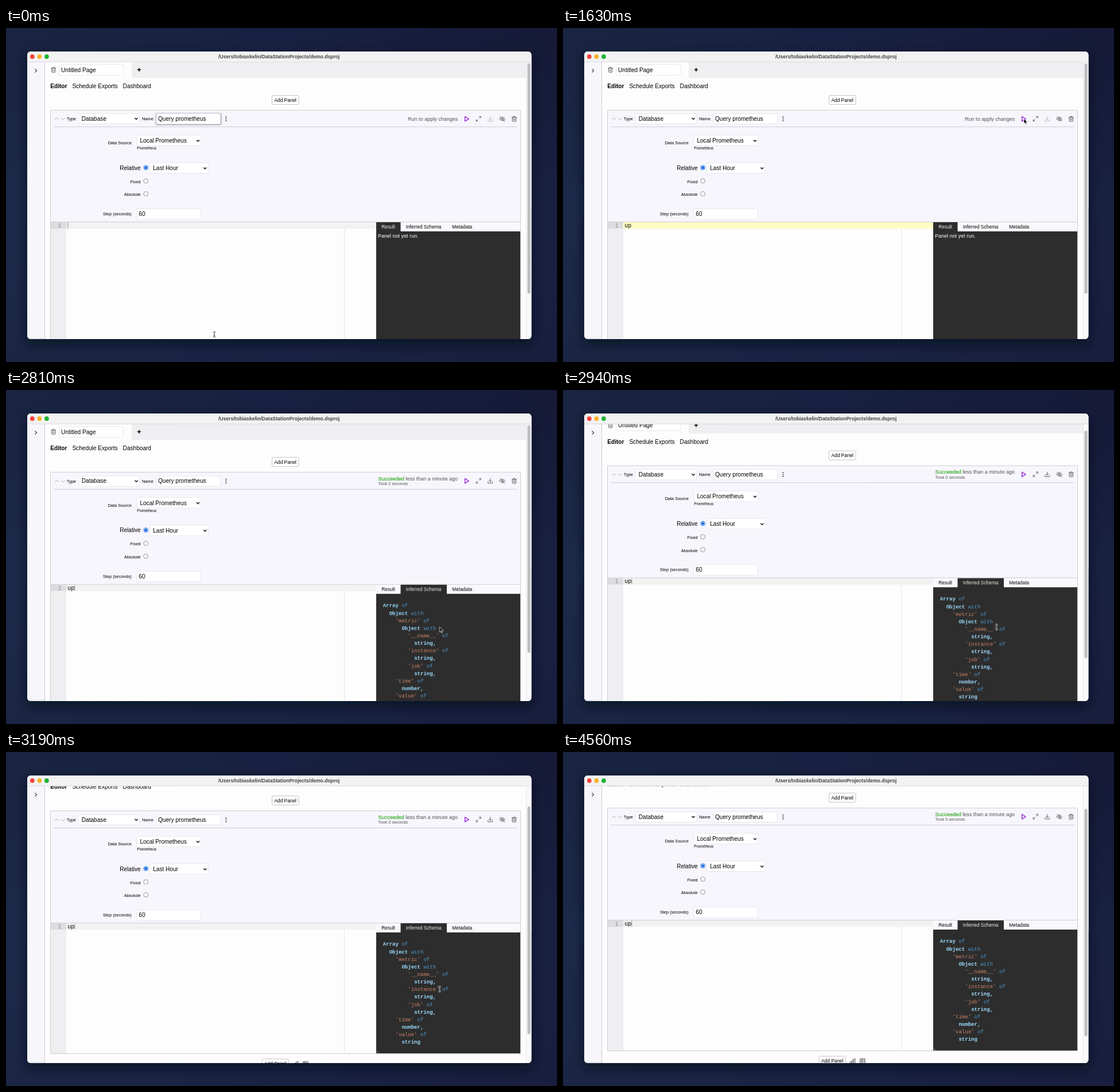
Recreate the animation shown at these times as an HTML page. Size 960x583 px, loop 4.62 s.

```html
<!DOCTYPE html>
<html lang="en">
<head>
<meta charset="utf-8">
<title>Panel demo</title>
<style>
html, body { margin: 0; width: 100%; height: 100%; overflow: hidden; background: #1a213f; }
svg { display: block; width: 100vw; height: 100vh; }
text { font: 10.1px "Liberation Sans", Arial, sans-serif; fill: #000; white-space: pre; }
.b { font-weight: bold; }
.s { font-size: 7.45px; }
.m { font-size: 8.35px; }
.l { font-size: 9.02px; }
.end { text-anchor: end; }
.mid { text-anchor: middle; }
.code { font: 10px "Liberation Mono", "Courier New", monospace; }
.out text { font: 9.05px "Liberation Mono", "Courier New", monospace; fill: #d4d4d4; }
.out .key { fill: #9cdcfe; font-weight: bold; }
.out .str { fill: #ce8466; }
.out .word { fill: #4f97cc; }
.box { fill: #fff; stroke: #e6e6ee; }
.btn { fill: #fff; stroke: #c4c4c8; }
.icon { fill: none; stroke: #555; stroke-width: .9; stroke-linecap: round; stroke-linejoin: round; }
.chev { fill: none; stroke: #111; stroke-width: 1.4; }
.line { stroke: #cdcdd4; fill: none; }

/* every part shares one 4620 ms clock */
.a { animation: 4620ms step-end infinite; }
.first { animation-name: first; }
.u { animation-name: u; }
.p { animation-name: p; }
.focus { animation-name: focus; }
.caret { animation-name: caret; }
.before { animation-name: before; }
.after { animation-name: after; }
.json { animation-name: json; }
.noschema { animation-name: noschema; }
.schema { animation-name: schema; }
.shift { animation-name: shift; }
.thumb { animation-name: thumb; }
.beam { animation-name: beam; }
.arrow { animation-name: arrow; }
.move { animation: move 4620ms linear infinite; }
.scroll { animation: scroll 4620ms linear infinite; }
.slide { animation: slide 4620ms linear infinite; }

@keyframes first { 0% { opacity: 1 } 1.3% { opacity: 0 } }
@keyframes u { 0% { opacity: 0 } 3.25%, 100% { opacity: 1 } }
@keyframes p { 0% { opacity: 0 } 5.63%, 100% { opacity: 1 } }
@keyframes focus { 0% { opacity: 0 } 1.3% { opacity: 1 } 36.58%, 100% { opacity: 0 } }
@keyframes caret {
  0% { opacity: 1; transform: none }
  3.25% { opacity: 1; transform: translateX(6px) }
  5.63% { opacity: 1; transform: translateX(12px) }
  12.1% { opacity: 0; transform: translateX(12px) }
  36.58%, 100% { opacity: 1; transform: translateX(12px) }
}
@keyframes before { 0% { opacity: 1 } 39.18%, 100% { opacity: 0 } }
@keyframes after { 0% { opacity: 0 } 39.18%, 100% { opacity: 1 } }
@keyframes json { 0% { opacity: 0 } 39.18% { opacity: 1 } 54.1%, 100% { opacity: 0 } }
@keyframes noschema { 0% { opacity: 1 } 54.1%, 100% { opacity: 0 } }
@keyframes schema { 0% { opacity: 0 } 54.1%, 100% { opacity: 1 } }
@keyframes shift { 0% { transform: none } 39.18%, 100% { transform: translateY(.7px) } }
@keyframes thumb { 0% { height: 402px } 39.18% { height: 324px } 54.1%, 100% { height: 397px } }
@keyframes beam {
  0% { opacity: 1 } 2.8% { opacity: 0 } 6.49% { opacity: 1 } 9.7% { opacity: 0 }
  62.3% { opacity: 1 } 74.4%, 100% { opacity: 0 }
}
@keyframes arrow {
  0% { opacity: 0 } 9.7% { opacity: 1 } 62.3% { opacity: 0 } 74.4% { opacity: 1 } 92.6%, 100% { opacity: 0 }
}
@keyframes scroll {
  0%, 62.1% { transform: none }
  66.2% { transform: translateY(-30px); animation-timing-function: ease-out }
  71.9%, 100% { transform: translateY(-45.7px) }
}
@keyframes slide {
  0%, 62.1% { transform: none }
  66.2% { transform: translateY(24.7px); animation-timing-function: ease-out }
  71.9%, 100% { transform: translateY(37.6px) }
}
@keyframes move {
  0%, 6.49% { transform: translate(363px, 535px); animation-timing-function: ease-in-out }
  12.12% { transform: translate(797px, 234px); animation-timing-function: ease-out }
  23.2%, 25.76% { transform: translate(812px, 214px); animation-timing-function: ease-in-out }
  31% { transform: translate(827px, 173px); animation-timing-function: ease-in-out }
  34.6%, 38% { transform: translate(803px, 158px); animation-timing-function: ease-in-out }
  46%, 48.7% { transform: translate(679px, 237.5px); animation-timing-function: ease-in-out }
  53%, 55.4% { transform: translate(728px, 346px); animation-timing-function: ease-in-out }
  59.3%, 73.2% { transform: translate(755.5px, 413.5px); animation-timing-function: ease-in-out }
  80.1%, 86.6% { transform: translate(819.5px, 361px); animation-timing-function: ease-in }
  92%, 100% { transform: translate(859px, 89px) }
}
</style>
</head>
<body>
<svg viewBox="0 0 960 583" preserveAspectRatio="none">
  <defs>
    <linearGradient id="sky" x1="0" y1="0" x2="1" y2="0">
      <stop offset="0" stop-color="#1b2743"/>
      <stop offset=".5" stop-color="#192242"/>
      <stop offset="1" stop-color="#171a37"/>
    </linearGradient>
    <linearGradient id="dusk" x1="0" y1="0" x2="0" y2="1">
      <stop offset="0" stop-color="#10183a" stop-opacity=".15"/>
      <stop offset=".5" stop-color="#1d3157" stop-opacity=".3"/>
      <stop offset="1" stop-color="#1b2446" stop-opacity=".4"/>
    </linearGradient>
    <filter id="blur" x="-10%" y="-10%" width="120%" height="125%"><feGaussianBlur stdDeviation="9"/></filter>
    <filter id="soft" x="-10%" y="-40%" width="120%" height="180%"><feGaussianBlur stdDeviation="1.3"/></filter>
    <clipPath id="win"><rect x="37" y="41" width="878.5" height="502" rx="6"/></clipPath>
    <clipPath id="pane"><rect x="645" y="339" width="251" height="227.5"/></clipPath>
    <path id="trash" class="icon" d="M-4 -2.8H4M-1.5 -2.8V-4.3H1.5V-2.8M-3.2 -2.8V3.4Q-3.2 4.4 -2.2 4.4H2.2Q3.2 4.4 3.2 3.4V-2.8M-1.1 -.8V2.4M1.1 -.8V2.4"/>
    <path id="down" class="chev" d="M-2.5 -1.3L0 1.3L2.5 -1.3"/>
    <path id="load" d="M0 -4.2V1.4M-2.5 -1L0 1.5L2.5 -1M-4 1.5V4H4V1.5"/>
  </defs>

  <rect width="960" height="583" fill="url(#sky)"/>
  <rect width="960" height="583" fill="url(#dusk)"/>
  <rect x="35" y="47" width="882" height="506" rx="8" fill="#050818" opacity=".6" filter="url(#blur)"/>

  <g clip-path="url(#win)">
    <rect x="37" y="41" width="879" height="502" fill="#fdfdfe"/>

    <g class="scroll">
      <rect x="219" y="60" width="688" height="27" fill="#efeff2"/>
      <use href="#trash" x="82.7" y="73"/>
      <rect class="box" x="92.5" y="63.5" width="112" height="19" rx="2"/>
      <text x="96" y="76.6">Untitled Page</text>
      <path d="M228.8 72.8H235M231.9 69.7V75.9" stroke="#000" stroke-width="1.5"/>
      <text class="b" x="77.3" y="105.3">Editor</text>
      <text x="115.4" y="105.3">Schedule Exports</text>
      <text x="203.6" y="105.3">Dashboard</text>
      <rect class="btn" x="463.5" y="117.5" width="46.5" height="16" rx="1.5"/>
      <text class="m mid" x="486.7" y="128.6">Add Panel</text>

      <rect x="77.5" y="143.5" width="819" height="423" fill="#f6f6fc"/>
      <path class="line" d="M77.5 567V143.5H896.5V567"/>

      <g class="a before">
        <text class="l end" x="787.3" y="161.7" style="fill:#555">Run to apply changes</text>
        <use href="#load" x="843.7" y="158.7" class="icon" style="stroke:#bbb"/>
      </g>
      <g class="a after">
        <text class="l" x="648.6" y="157.6" style="fill:#555"><tspan fill="#35a826" stroke="#35a826" stroke-width=".2">Succeeded</tspan> less than a minute ago</text>
        <text class="s" x="648.6" y="166.2" style="fill:#555">Took 0 seconds</text>
        <use href="#load" x="843.7" y="158.7" class="icon"/>
      </g>
      <path d="M799.7 154.6V162.8L806.3 158.7Z" fill="none" stroke="#8a0bd2" stroke-width="1.2" stroke-linejoin="round"/>
      <path class="icon" d="M824.3 157.4L827.2 154.5M824.6 154.5H827.2V157.1M822.2 159.6L819.2 162.6M819.2 160V162.6H821.8"/>
      <path class="icon" d="M860 158.7Q864.8 152 869.6 158.7Q864.8 165.4 860 158.7ZM860.7 154.4L869 163"/>
      <circle class="icon" cx="864.8" cy="158.7" r="1.5"/>
      <use href="#trash" x="885.4" y="158.7"/>

      <g class="a shift">
        <path d="M85.2 160L88.5 156.7L91.8 160M96.2 157L99.5 160.3L102.8 157" fill="none" stroke="#aaa"/>
        <text class="s" x="105.8" y="161">Type</text>
        <rect class="box" x="126.5" y="149.5" width="106" height="18" rx="2"/>
        <text x="131.8" y="161.7">Database</text>
        <use href="#down" x="227" y="158.3"/>
        <text class="s" x="237" y="161">Name</text>
        <rect class="a first" x="261" y="149" width="114" height="20" rx="3" fill="#889" opacity=".5" filter="url(#soft)"/>
        <rect class="box" x="262" y="149.5" width="111.5" height="18" rx="2"/>
        <text x="265" y="161.7">Query prometheus</text>
        <g fill="#333"><circle cx="383.4" cy="155" r="1"/><circle cx="383.4" cy="158.4" r="1"/><circle cx="383.4" cy="161.8" r="1"/></g>
        <path class="line" d="M83 172.5H890.5"/>

        <text class="s end" x="218.8" y="203.1">Data Source</text>
        <rect class="box" x="228" y="187" width="112" height="18.5" rx="2"/>
        <text x="233.4" y="200.1">Local Prometheus</text>
        <use href="#down" x="334.5" y="196.7"/>
        <text x="228.3" y="212" style="font-size:6.3px">Prometheus</text>

        <text class="end" x="234.6" y="247.7">Relative</text>
        <rect class="box" x="250.5" y="235" width="102" height="18.5" rx="2"/>
        <text x="256.2" y="248.1">Last Hour</text>
        <use href="#down" x="346.8" y="244.7"/>
        <circle cx="243.7" cy="243.7" r="3.8" fill="#fff" stroke="#1a6be0"/>
        <circle cx="243.7" cy="243.7" r="2.5" fill="#1a6be0"/>
        <text class="s end" x="234.7" y="270.7">Fixed</text>
        <circle cx="243.7" cy="266.9" r="3.9" fill="#fff" stroke="#777" stroke-width=".8"/>
        <text class="s end" x="234.7" y="293.3">Absolute</text>
        <circle cx="243.7" cy="289.4" r="3.9" fill="#fff" stroke="#777" stroke-width=".8"/>
        <text class="s end" x="218.8" y="327.2">Step (seconds)</text>
        <rect class="box" x="228" y="315.5" width="111.5" height="18.5" rx="2"/>
        <text x="231.3" y="328.1">60</text>

        <rect x="78" y="339" width="27" height="227.5" fill="#efeff1"/>
        <rect x="105" y="339" width="540" height="227.5" fill="#fdfdfe"/>
        <path d="M589.5 339V566" stroke="#e6e6e8"/>
        <rect x="78" y="339" width="27" height="11.3" fill="#dddde0"/>
        <rect x="105" y="339" width="540" height="11.3" fill="#f2f2f3"/>
        <rect class="a focus" x="105" y="339" width="540" height="11.3" fill="#fefdc4"/>
        <text class="code" x="90.5" y="348" style="fill:#8c8c8c">1</text>
        <text class="code a u" x="107.2" y="348">u</text>
        <text class="code a p" x="113.2" y="348">p</text>
        <path class="a caret" d="M107.8 339.8V349.8" stroke="#888"/>

        <g clip-path="url(#pane)">
          <rect x="645" y="339" width="251" height="16" fill="#f9f9fd"/>
          <rect x="645" y="355" width="251" height="212" fill="#2d2d2d"/>
          <rect class="a noschema" x="645" y="339" width="42.5" height="17" fill="#2d2d2d"/>
          <rect class="a schema" x="687.5" y="339" width="80.5" height="17" fill="#2d2d2d"/>
          <text class="m" x="654.3" y="349.9">Result</text>
          <text class="m a noschema" x="654.3" y="349.9" style="fill:#fff">Result</text>
          <text class="m" x="696.8" y="349.9">Inferred Schema</text>
          <text class="m a schema" x="696.8" y="349.9" style="fill:#fff">Inferred Schema</text>
          <text class="m" x="777.3" y="349.9">Metadata</text>
          <text class="l a before" x="648" y="366.3" style="fill:#fff">Panel not yet run.</text>
          <g id="json" class="out a json"></g>
          <g id="schema" class="out a schema"></g>
          <path d="M646 562L649.5 565.5M646 564.2L647.5 565.7" stroke="#999" stroke-width=".7"/>
        </g>
        <path class="line" d="M78 338.5H896M77.5 566.5H896.5"/>
      </g>

      <rect class="btn" x="446.2" y="576.7" width="46.3" height="16" rx="1.5"/>
      <text class="m mid" x="469.3" y="588">Add Panel</text>
      <path class="icon" d="M500.3 589V586H502.7V589ZM503.6 589V583.5H506V589ZM506.8 589V581H509.2V589Z"/>
      <path class="icon" d="M518 581H526V589H518ZM518 583.5H526M518 586.3H526M521 581V589"/>
    </g>

    <rect x="37" y="59" width="31" height="484" fill="#f6f6fb"/>
    <path class="line" d="M67.5 59V543"/>
    <path d="M37 541.5H67" stroke="#dcdce2"/>
    <path d="M50.4 71.3L53.6 74.5L50.4 77.7" fill="none" stroke="#333" stroke-width="1.1"/>

    <rect x="906.5" y="59" width="9" height="484" fill="#fafafb"/>
    <path d="M906.5 59V543" stroke="#e6e6ea"/>
    <g class="slide"><rect class="a thumb" x="908.5" y="61.5" width="5.2" height="402" rx="2.6" fill="#bdbdc0"/></g>

    <rect x="37" y="41" width="879" height="18.5" fill="#f3f2f3"/>
    <path d="M37 59.3H916" stroke="#d6d5d8" stroke-width=".8"/>
    <circle cx="45.8" cy="50" r="3.9" fill="#f4443e"/>
    <circle cx="58.3" cy="50" r="3.9" fill="#f8b224"/>
    <circle cx="70.9" cy="50" r="3.9" fill="#1fb335"/>
    <text class="b mid" x="475.7" y="53" style="font-size:8.6px;fill:#444">/Users/tobiaskelin/DataStationProjects/demo.dsproj</text>
  </g>

  <g class="move">
    <g class="a beam" fill="none">
      <path id="bar" d="M-2.2 -4.6Q0 -4.6 0 -3.2Q0 -4.6 2.2 -4.6M0 -3.4V3.4M-2.2 4.6Q0 4.6 0 3.2Q0 4.6 2.2 4.6M-1.2 1.3H1.2" stroke="#fff" stroke-width="2"/>
      <path d="M-2.2 -4.6Q0 -4.6 0 -3.2Q0 -4.6 2.2 -4.6M0 -3.4V3.4M-2.2 4.6Q0 4.6 0 3.2Q0 4.6 2.2 4.6M-1.2 1.3H1.2" stroke="#222" stroke-width=".9"/>
    </g>
    <path class="a arrow" d="M0 0V9.2L2.1 7.3L3.5 10.6L5 10L3.6 6.8H6.4Z" fill="#000" stroke="#fff" stroke-width=".8" stroke-linejoin="round"/>
  </g>
</svg>
<script>
const LINE = 13.15, INDENT = 10.87, LEFT = 656.8, TOP = 378.4;

function addLine(id, row, level, parts) {
  const span = ([cls, str]) => `<tspan class="${cls}">${str}</tspan>`;
  document.getElementById(id).insertAdjacentHTML("beforeend",
    `<text x="${LEFT + level * INDENT}" y="${TOP + row * LINE}">${parts.map(span).join("")}</text>`);
}

const record = [["", "{ "], ["key", '"metric"'], ["", ": { "], ["key", '"__name__"'], ["", ": "],
  ["str", '"up"'], ["", ", "], ["key", '"instance"'], ["", ": "]];
addLine("json", 0, 0, [["", "["]]);
for (let i = 1; i <= 14; i++) addLine("json", i, 1, record);

const tree = ["0Array of", "1Object with", "2'metric' of", "3Object with", "4'__name__' of", "5string,",
  "4'instance' of", "5string,", "4'job' of", "5string,", "2'time' of", "3number,", "2'value' of", "3string"];
tree.forEach((entry, row) => {
  const [head, word] = entry.slice(1).split(" ");
  const parts = [[head[0] === "'" ? "str" : "key", head]];
  if (word) parts.push(["word", " " + word]);
  addLine("schema", row, +entry[0], parts);
});
</script>
</body>
</html>
```
